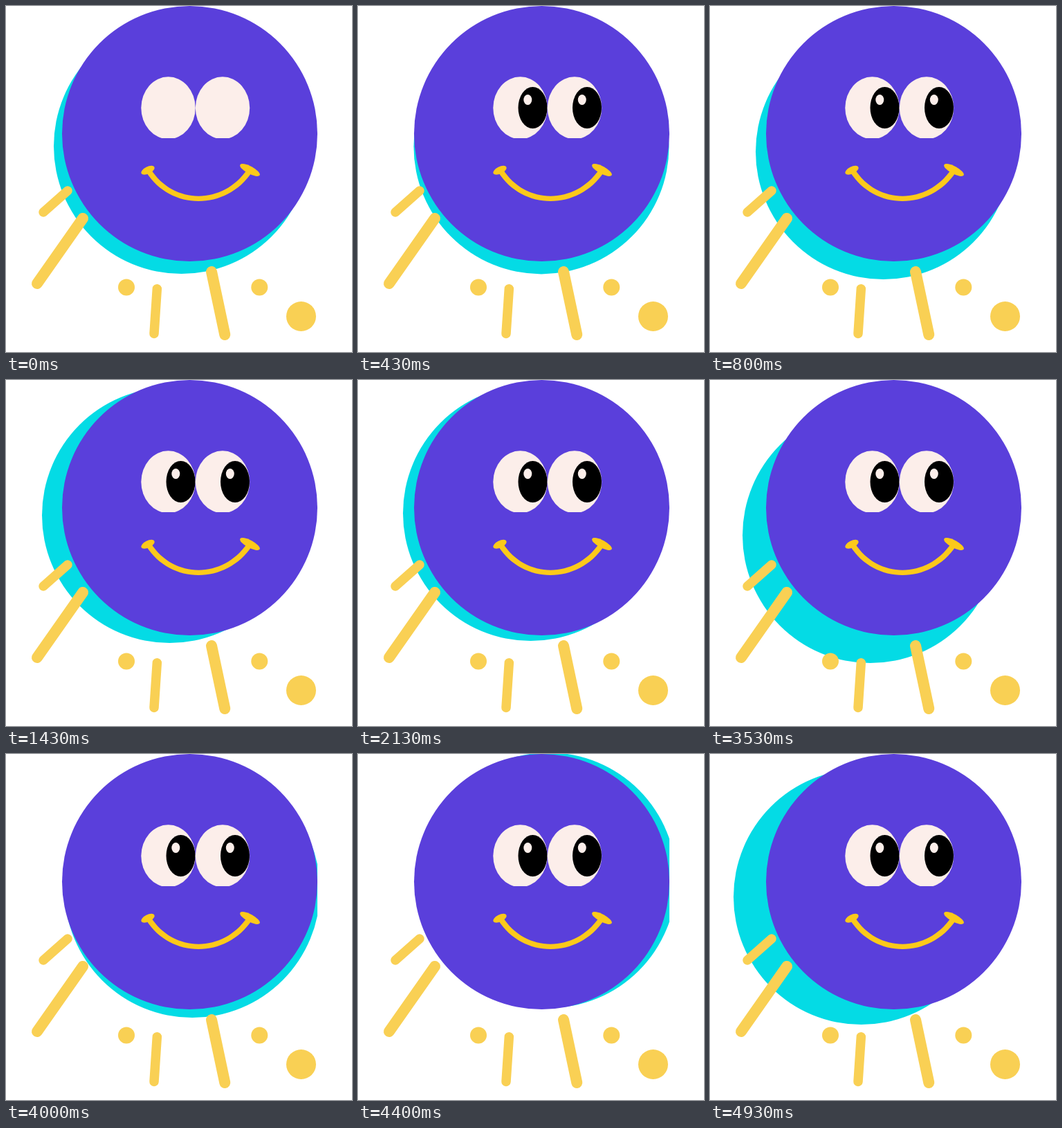
An HTML page with a canvas that plays this animation: 500x500 px, repeating every 5010 ms.

```html
<!DOCTYPE html>
<html lang="en">
<head>
<meta charset="utf-8">
<title>Smiling ball</title>
<style>
html, body { margin: 0; width: 100%; height: 100%; overflow: hidden; background: #fff; }
canvas { display: block; }
</style>
</head>
<body>
<canvas id="stage" width="500" height="500"></canvas>
<script>
const ctx = document.getElementById('stage').getContext('2d');
const LOOP = 5010;
const LAST_STEP = 4930;
const BALL = { x: 265.5, y: 184.5, r: 184.5 };
const YELLOW = '#f9d054';
const GOLD = '#fcc91a';
const CREAM = '#fceeea';

// Resting offsets of the cyan disc; it sways on its way between them.
const POSES = [
  { at: 0, x: -12, y: 18 },
  { at: 800, x: -15, y: 26 },
  { at: 1430, x: -29, y: 11 },
  { at: 2130, x: -16, y: 8 },
  { at: 3530, x: -34, y: 40 },
  { at: 4400, x: 10, y: -2 },
  { at: LAST_STEP, x: -47, y: 22 }
];
const SWAY = { x: 14, y: 9, halfPeriod: 250 };

// Two steps per 100 ms, held for 30 ms and 70 ms.
function stepTime(ms) {
  const part = ms % 100;
  return Math.min(LAST_STEP, ms - part + (part >= 30 ? 30 : 0));
}

function discOffset(ms) {
  const next = Math.max(1, POSES.findIndex(pose => pose.at >= ms));
  const a = POSES[next - 1], b = POSES[next];
  const span = b.at - a.at;
  const p = (ms - a.at) / span;
  const ease = (1 - Math.cos(Math.PI * p)) / 2;
  const swings = Math.round(span / SWAY.halfPeriod);
  const sway = count => Math.sin(Math.PI * count * p);
  return {
    x: a.x + (b.x - a.x) * ease - SWAY.x * sway(swings),
    y: a.y + (b.y - a.y) * ease - SWAY.y * sway(swings + 1)
  };
}

function ellipse(color, x, y, rx, ry = rx, degrees = 0) {
  ctx.fillStyle = color;
  ctx.beginPath();
  ctx.ellipse(x, y, rx, ry, degrees * Math.PI / 180, 0, 2 * Math.PI);
  ctx.fill();
}

function ray(x0, y0, x1, y1, width) {
  ctx.strokeStyle = YELLOW;
  ctx.lineWidth = width;
  ctx.lineCap = 'round';
  ctx.beginPath();
  ctx.moveTo(x0, y0);
  ctx.lineTo(x1, y1);
  ctx.stroke();
}

function drawEye(x, open) {
  ctx.save();
  ctx.beginPath();
  ctx.rect(x - 45, 95, 90, 96);
  ctx.clip();
  ellipse(CREAM, x, 147.3, 39.2, 45);
  if (open) {
    ellipse('#000', x + 18, 147, 21, 30);
    ellipse(CREAM, x + 10.8, 135.5, 6, 7.5);
  }
  ctx.restore();
}

function drawSmile() {
  ctx.fillStyle = GOLD;
  ctx.beginPath();
  ctx.moveTo(202.5, 240);
  ctx.bezierCurveTo(238, 296, 318, 296, 355.5, 240);
  ctx.lineTo(348.5, 236);
  ctx.bezierCurveTo(314, 287.5, 242, 287.5, 209.5, 236);
  ctx.fill();
  ellipse(GOLD, 205, 237.3, 10.5, 5, -26);
  ellipse(GOLD, 352.5, 237, 16, 5.5, 28);
}

function drawRays() {
  ray(89, 267, 54, 298, 13.5);
  ray(111, 307, 45, 401, 16);
  ray(218.3, 408.7, 214, 473.5, 13.5);
  ray(297, 384, 316.3, 475, 16);
  ellipse(YELLOW, 174, 406.5, 12);
  ellipse(YELLOW, 366.3, 406.5, 12);
  ellipse(YELLOW, 426.5, 448.5, 21.5);
}

function draw(ms) {
  const offset = discOffset(ms);
  const open = ms > 0;
  ctx.clearRect(0, 0, 500, 500);
  ctx.save();
  ctx.beginPath();
  ctx.rect(0, 0, 450, 500);
  ctx.clip();
  ellipse('#04dbe5', BALL.x + offset.x, BALL.y + offset.y, BALL.r);
  ellipse('#5a3fdb', BALL.x, BALL.y, BALL.r);
  drawEye(234.5, open);
  drawEye(313, open);
  drawSmile();
  drawRays();
  ctx.restore();
}

function tick() {
  draw(stepTime(performance.now() % LOOP));
  requestAnimationFrame(tick);
}
tick();
</script>
</body>
</html>
```
